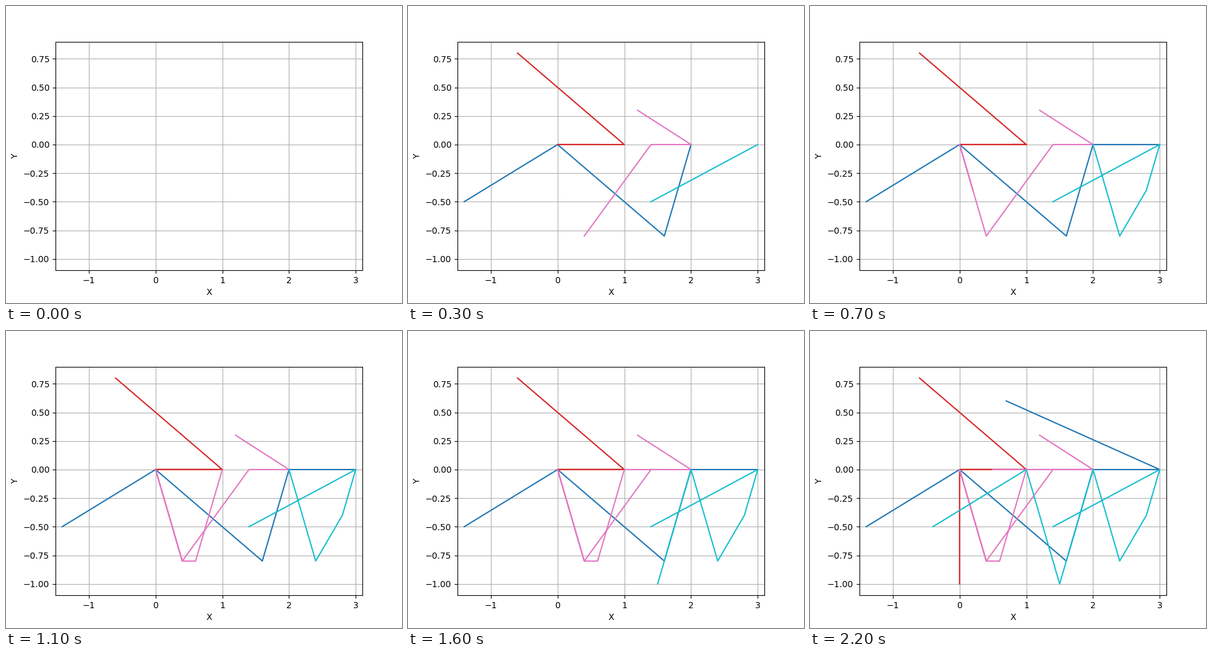
Animation of 640x480 px, one loop 2300 ms. Source, as a matplotlib script:

```python
import math

import numpy as np
import matplotlib.pyplot as plt
from matplotlib.animation import FuncAnimation

# Four agents enter, trade places in a row of slots, then leave
START = [(-1.4, -0.5), (-0.6, 0.8), (1.2, 0.3), (1.4, -0.5)]
END = [(0.7, 0.6), (0.0, -1.0), (0.5, 0.0), (-0.4, -0.5)]
RANK = [2, 0, 1, 3]  # in a swap the higher rank dives below the row
SWAPS, TICKS = 6, 10


def swap_pair(order, n):
    """Left slot of swap n (ruler sequence), with its straight and diving agent."""
    n += 1
    left = (n & -n).bit_length() - 1
    straight, diver = sorted(order[left:left + 2], key=lambda k: RANK[k])
    return left, straight, diver


def positions(tick):
    """Positions of all agents after the given number of ticks."""
    done, rest = divmod(tick, TICKS)
    order = list(range(len(START)))
    for n in range(done):
        left = swap_pair(order, n)[0]
        order[left:left + 2] = order[left:left + 2][::-1]
    pos = [(float(order.index(k)), 0.0) for k in range(len(order))]
    if rest:
        f = rest / TICKS
        _, a, b = swap_pair(order, done)
        xa, xb = order.index(a), order.index(b)
        pos[a] = (xa + (xb - xa) * f, 0.0)
        pos[b] = (xb + (xa - xb) * f, abs(1 - 2 * f) - 1)
    return pos


def sample_ticks():
    """Ticks to show: large strides first, slowing to one in the last swap."""
    left = SWAPS * TICKS
    while left > 0:
        yield SWAPS * TICKS - left
        left -= (2 if left > TICKS else 1) * math.ceil(left ** 2 / 480)
    yield SWAPS * TICKS


track = np.array([START] + [positions(t) for t in sample_ticks()] + [END])

fig, ax = plt.subplots(figsize=(6.4, 4.8), dpi=100)
low, high = track.min(axis=(0, 1)), track.max(axis=(0, 1))
ax.set_xlim(low[0] - 0.1, high[0] + 0.1)
ax.set_ylim(low[1] - 0.1, high[1] + 0.1)
ax.set_xlabel("X")
ax.set_ylabel("Y")
ax.grid(True)

colors = plt.get_cmap("tab10")(np.linspace(0, 1, len(START)))
lines = [ax.plot([], [], color=c)[0] for c in colors]


def update(i):
    for k, line in enumerate(lines):
        line.set_data(track[:i + 1, k, 0], track[:i + 1, k, 1])
    return lines


anim = FuncAnimation(fig, update, frames=len(track), interval=100,
                     repeat=True, repeat_delay=0)
plt.show()
```
